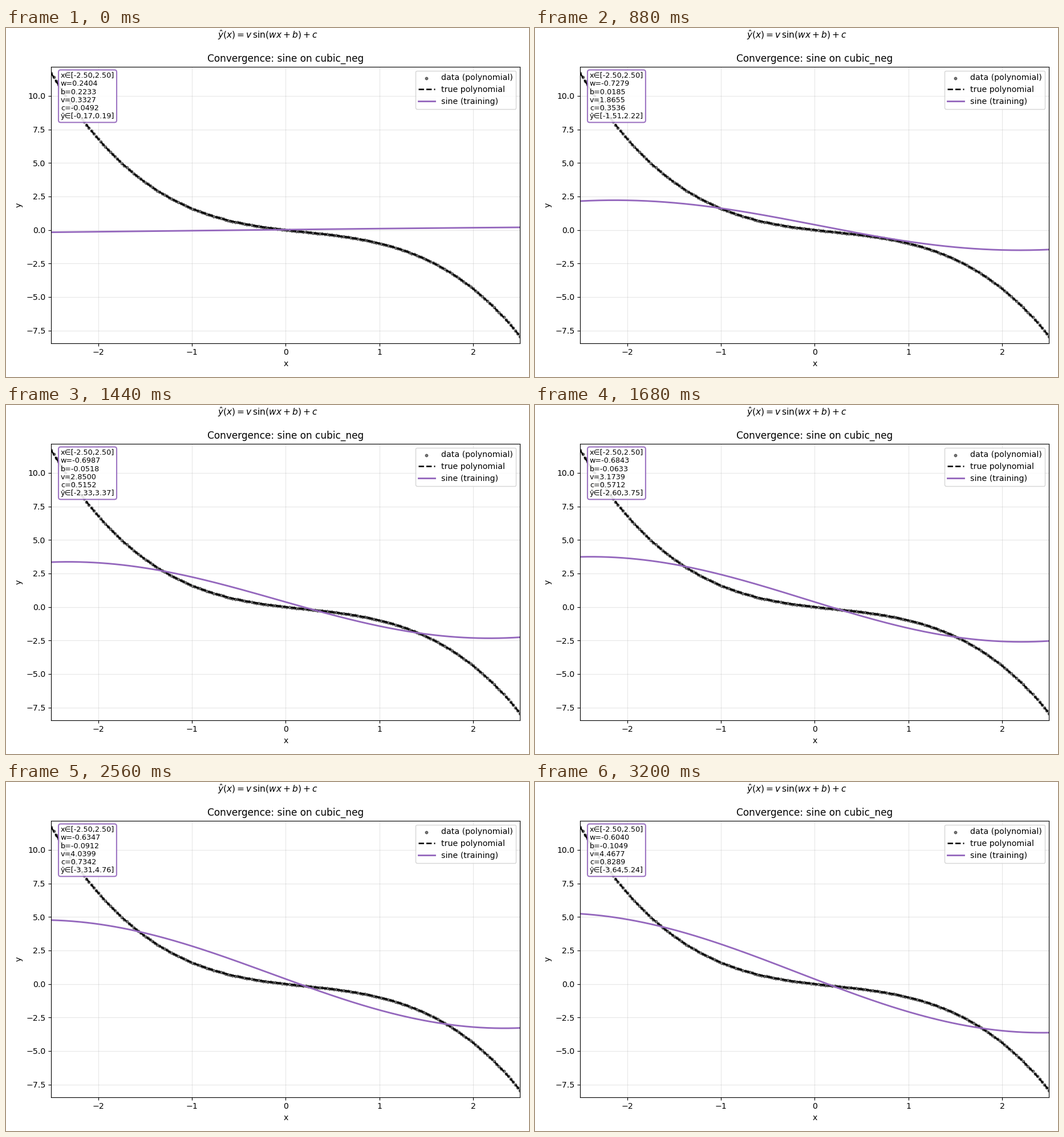
Write a matplotlib script that moves like this. It is 917 by 611 pixels and loops after 3280 ms.

```python
import numpy as np
import matplotlib.pyplot as plt
from matplotlib.animation import FuncAnimation

W, H, DPI = 917, 611, 101.87
FRAMES, INTERVAL = 41, 80
PURPLE = "tab:purple"
LR, STEPS = 0.001, 50  # gradient steps taken between two frames
START = (0.2404, 0.2233, 0.3327, -0.04924)  # w, b, v, c

x = np.linspace(-2.5, 2.5, 200)
y = -0.5 * x**3 + 0.3 * x**2 - 0.8 * x


def predict(p):
    w, b, v, c = p
    return v * np.sin(w * x + b) + c


def descend(p):
    """One full-batch gradient step on the mean squared error."""
    w, b, v, _ = p
    s, k = np.sin(w * x + b), np.cos(w * x + b)
    e = predict(p) - y
    grad = [np.mean(e * v * k * x), np.mean(e * v * k),
            np.mean(e * s), np.mean(e)]
    return p - 2 * LR * np.array(grad)


def train():
    """Parameters at every frame of the run."""
    p = np.array(START)
    history = [p]
    for step in range(1, (FRAMES - 1) * STEPS + 1):
        p = descend(p)
        if step % STEPS == 0:
            history.append(p)
    return history


def describe(p, fit):
    values = "\n".join(f"{name}={val:.4f}" for name, val in zip("wbvc", p))
    return (f"x∈[{x[0]:.2f},{x[-1]:.2f}]\n{values}\n"
            f"ŷ∈[{fit.min():.2f},{fit.max():.2f}]")


history = train()

plt.rcParams["font.family"] = "DejaVu Sans"
fig, ax = plt.subplots(figsize=((W + 1e-3) / DPI, (H + 1e-3) / DPI), dpi=DPI)
fig.subplots_adjust(left=79.4 / W, right=901.45 / W,
                    top=1 - 67.55 / H, bottom=1 - 551.55 / H)
fig.text(0.5, 1 - 17.6 / H, r"$\hat{y}(x) = v\,\sin(wx + b) + c$",
         fontsize=11, ha="center", va="baseline")

ax.scatter(x, y, s=10, color="black", alpha=0.5, label="data (polynomial)")
ax.plot(x, y, "k--", lw=1.8, label="true polynomial")
curve, = ax.plot(x, predict(START), color=PURPLE, lw=2,
                 label="sine (training)")
info = ax.text(0.02, 0.98, "", transform=ax.transAxes, fontsize=9, va="top",
               linespacing=1.125,
               bbox=dict(boxstyle="round,pad=0.3", fc="white", ec=PURPLE,
                         lw=1.5, alpha=0.9))

ax.set_xlim(-2.5, 2.5)
ax.set_ylim(y.min() - 0.5, y.max() + 0.5)
ax.set_xlabel("x")
ax.set_ylabel("y")
ax.set_title("Convergence: sine on cubic_neg")
ax.grid(True, alpha=0.3)
ax.legend(loc="upper right")


def update(i):
    fit = predict(history[i])
    curve.set_ydata(fit)
    info.set_text(describe(history[i], fit))
    return curve, info


anim = FuncAnimation(fig, update, frames=FRAMES, interval=INTERVAL,
                     repeat=True, repeat_delay=0, blit=False)
plt.show()
```
